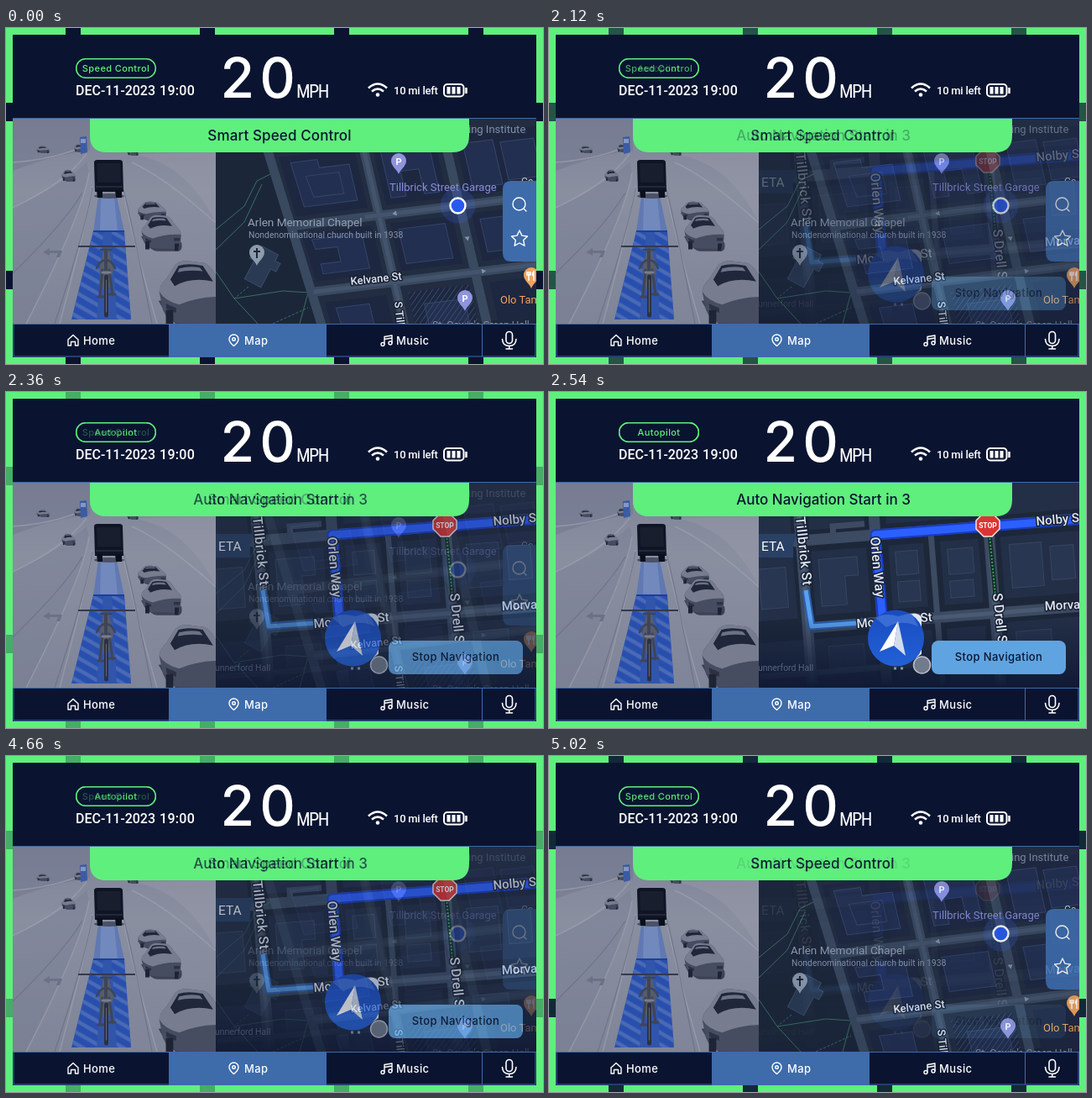
An HTML page for the animation above (5080 ms loop, 640 px wide and 400 px high).

```html
<!DOCTYPE html>
<html lang="en">
<head>
<meta charset="utf-8">
<title>Dashboard</title>
<style>
html, body { margin: 0; width: 100%; height: 100%; overflow: hidden; background: #0a1430; }
svg { display: block; width: 640px; height: 400px; }
text { font-family: Roboto, "Noto Sans", sans-serif; }
.ui { font-family: Inter, "Open Sans", sans-serif; font-weight: 500; }
.mid { text-anchor: middle; }
.banner { font-size: 17px; fill: #0a1430; }
.chip { font-size: 11px; fill: #5fef7d; letter-spacing: .4px; }
.nav { font-size: 13px; fill: #fff; letter-spacing: .4px; }
.info { font-weight: 500; fill: #fff; }
.unit { font-family: "Roboto Condensed", "Liberation Sans Narrow", Roboto, sans-serif;
  font-size: 22px; font-stretch: extra-condensed; letter-spacing: -1.5px; fill: #fff; }
.street { font-weight: 500; fill: #e2e7ef; stroke: #172136; stroke-width: 3px;
  stroke-linejoin: round; paint-order: stroke; }
.line { fill: none; stroke: #fff; stroke-width: 1.4; stroke-linecap: round; stroke-linejoin: round; }

/* ten even steps in, a hold, nine even steps out */
#guided { animation: blend 5080ms infinite; }
@keyframes blend {
  0% { opacity: 0; animation-timing-function: step-end; }
  39.37% { opacity: 0; animation-timing-function: steps(10, start); }
  51.181% { opacity: 1; animation-timing-function: step-end; }
  89.37% { opacity: 1; animation-timing-function: steps(9, start); }
  100% { opacity: .1; }
}
</style>
</head>
<body>
<svg viewBox="0 0 640 400">
<defs>
  <clipPath id="mapClip"><path d="M250 108H632V352H250z"/></clipPath>
  <clipPath id="roadClip"><path d="M8 108H250V352H8z"/></clipPath>
  <clipPath id="laneClip"><path d="M104 242H141L149 347H78z"/></clipPath>
  <linearGradient id="ground" x2="0" y2="1">
    <stop offset="0" stop-color="#7d8396"/><stop offset=".35" stop-color="#8a8fa0"/>
    <stop offset="1" stop-color="#7f8598"/>
  </linearGradient>
  <linearGradient id="dusk" x2="0" y2="1">
    <stop offset="0" stop-color="#101a34" stop-opacity="0"/>
    <stop offset="1" stop-color="#101a34"/>
  </linearGradient>
  <linearGradient id="puck" x2="0" y2="1">
    <stop offset="0" stop-color="#1a4bc0"/><stop offset="1" stop-color="#2260d6"/>
  </linearGradient>
  <pattern id="hatch" width="5" height="5" patternUnits="userSpaceOnUse" patternTransform="rotate(45)">
    <path d="M0 0V5" stroke="#3a4c69" stroke-width="1.6"/>
  </pattern>
  <pattern id="stripes" width="12" height="12" patternUnits="userSpaceOnUse" patternTransform="rotate(30)">
    <path d="M0 3H12" stroke="#4a6ab5" stroke-width="4.5"/>
  </pattern>
  <symbol id="car" viewBox="0 0 100 80" preserveAspectRatio="none">
    <path d="M2 48Q20 76 40 78H92Q102 74 98 60L60 44z" fill="#3c4255"/>
    <path d="M3 38Q4 30 12 25L24 10Q30 4 44 5L64 7Q72 9 79 20L92 33Q98 38 97 50L95 66Q92 73 84 73L28 72Q14 70 8 58z" fill="#474d60"/>
    <path d="M3 38Q4 30 12 25L24 10Q30 4 44 5L64 7Q72 9 79 20L92 33Q96 38 97 44Q60 42 30 52Q10 48 3 38z" fill="#777d8f"/>
    <path d="M18 25L29 10Q42 7 62 10L76 27Q46 22 24 32z" fill="#20273a"/>
    <path d="M30 13Q44 10 58 12L62 16Q44 14 28 17z" fill="#6c7285"/>
    <path d="M12 51L26 56V61L13 57zM80 51H95L94 57H80z" fill="#2c3245"/>
    <path d="M12 58H22V74H12zM82 62H93L90 77H82z" fill="#1e2434"/>
  </symbol>
  <symbol id="pin" viewBox="-10 -11 20 27" overflow="visible">
    <path d="M0 15C-2 9-9 6-9-1A9 9 0 1 1 9-1C9 6 2 9 0 15z"/>
  </symbol>
</defs>

<rect width="640" height="400" fill="#5fef7d"/>
<rect x="8" y="8" width="624" height="384" fill="#0a1430"/>
<!-- gaps in the frame: every 160 across, every 200 down -->
<g fill="none" stroke="#0a1430" stroke-width="8">
  <path d="M71 4H640M71 396H640" stroke-dasharray="18 142"/>
  <path d="M4 89V400M636 89V400" stroke-dasharray="22 178"/>
</g>

<!-- header -->
<text class="info" x="83" y="80" font-size="16">DEC-11-2023</text>
<text class="info" x="183" y="80" font-size="16" letter-spacing=".3">19:00</text>
<text class="ui" x="255.500" y="83" font-size="66" letter-spacing="6" fill="#fff">20</text>
<text class="unit" x="346" y="83">MPH</text>
<g fill="none" stroke="#fff" stroke-width="2.6">
  <path d="M432 71.500Q443 61.500 454 71.500M436 75.500Q443 69.500 450 75.500"/>
  <circle cx="443" cy="79.500" r="2.300" fill="#fff" stroke="none"/>
  <rect x="522" y="67" width="23.500" height="14.500" rx="4" stroke-width="2"/>
  <path d="M548.500 71V78" stroke-width="2.500"/>
  <path d="M527.500 70V78.500M533.500 70V78.500M539.500 70V78.500" stroke-width="4"/>
</g>
<text class="info" x="462" y="79" font-size="13" letter-spacing="-.25">10 mi left</text>

<!-- road view -->
<g clip-path="url(#roadClip)">
  <path d="M8 108H250V352H8z" fill="url(#ground)"/>
  <path d="M8 108H100V146Q60 150 8 170z" fill="#70778d" opacity=".5"/>
  <path d="M8 214Q70 185 96 160L99 172Q88 232 24 352H8z" fill="#747a8f" opacity=".35"/>
  <path d="M150 150Q215 160 250 232V148z" fill="#989cab" opacity=".4"/>
  <g fill="none" stroke="#a0a4b2" stroke-width="1.500" opacity=".6">
    <path d="M99 172Q92 220 24 352M103 188Q98 225 64 352M139 190Q148 240 180 352"/>
    <path d="M96 150Q70 185 8 214M8 160Q60 156 94 140M150 160Q190 178 250 232"/>
  </g>
  <path d="M103 190Q96 236 58 352M140 192Q153 245 174 352M91 196Q70 232 8 292" fill="none" stroke="#696f84" stroke-width="1.200" opacity=".75"/>
  <path d="M44 267L52 262V265H67L64 273H60L62 268H52V271z" fill="#6b7186"/>
  <use href="#car" x="36" y="140" width="16" height="9"/>
  <use href="#car" x="66" y="168" width="17" height="15"/>
  <use href="#car" x="144" y="142" width="14" height="10"/>
  <use href="#car" x="81" y="138" width="12" height="10"/>
  <path d="M88 130L96 129L97 148L89 150z" fill="#3c5ba3"/><path d="M89 132H95V137H89z" fill="#8397c0"/>
  <path d="M110 201H132L141 242H104z" fill="#6079b2"/>
  <path d="M113 201H129L133 242H112z" fill="#7189bd"/>
  <g clip-path="url(#laneClip)">
    <path d="M70 242H155V348H70z" fill="#294fae"/>
    <path d="M70 242H155V348H70z" fill="url(#stripes)"/>
    <path d="M116 242H126L132 348H108z" fill="#3155ab"/>
  </g>
  <path d="M104 242H141" stroke="#1b3f9c" stroke-width="2"/>
  <ellipse cx="123" cy="200" rx="18" ry="3" fill="#4b5166"/>
  <path d="M105 160Q105 157 109 157H135Q139 157 139 160L140 195H106z" fill="#0f1524"/>
  <path d="M108 161H136L137 184H109z" fill="#181e2e"/>
  <path d="M107 189H139" stroke="#222939" stroke-width="2"/>
  <path d="M108 193H115V202H109zM130 193H138V202H131z" fill="#0a0f1c"/>
  <use href="#car" x="156" y="205" width="36" height="25"/>
  <use href="#car" x="160" y="220" width="50" height="47"/>
  <use href="#car" x="180" y="272" width="88" height="88"/>
  <path d="M86 260H154" stroke="#323950" stroke-width="1.800"/>
  <path d="M117 262H122L128 288L122 312H116L111 288z" fill="#565c6c"/>
  <g fill="none" stroke="#3f4557" stroke-linecap="round">
    <path d="M119 264V290" stroke-width="4"/>
    <path d="M108 286Q111 277 119 276Q127 277 130 286M113 264H126" stroke-width="2.500"/>
    <path d="M115 288L112 318M123 288L127 318M110 320H116M123 317H130" stroke-width="3"/>
    <path d="M119.500 296V342" stroke="#2b3142" stroke-width="5"/>
    <path d="M119.500 300V338" stroke="#5c6273" stroke-width="1.200"/>
    <path d="M115 291H124" stroke="#777d8e" stroke-width="3"/>
  </g>
</g>

<!-- area map -->
<g clip-path="url(#mapClip)">
  <path d="M250 108H632V352H250z" fill="#1c2639"/>
  <g fill="none" stroke="#38705f" stroke-width="1">
    <path d="M250 240L284 212L299 182L315 174M250 264L284 231L305 186M250 290L272 322L300 352M272 322L330 313L360 315L350 352"/>
    <path d="M318 352L360 333M289 308L272 322" stroke-dasharray="3 2"/>
  </g>
  <g transform="rotate(28 303 287)" fill="#2a3a53" stroke="#3b4e6a">
    <path d="M292 262H314V270H321V281H314V306H292V281H286V270H292z"/>
  </g>
  <g transform="translate(442 305) rotate(-7) skewX(6)">
    <path d="M-93-220L-74 60H240V-220z" fill="#222d41"/>
    <path d="M-80-164H10V-92H-76zM32-164H106V-92H32zM130-164H240V-92H130z
      M-74-70H10V-12H-70zM32-70H106V-12H32zM130-70H240V-12H130zM-66 14H8V80H-62zM34 14H108V80H34zM132 14H240V80H132z" fill="#1d2740"/>
    <g fill="#232f50" stroke="#34446a">
      <path d="M-68-156H-36V-146H0V-102H-64zM-54-138H-14V-112H-50z"/>
      <path d="M40-156H98V-100H80V-130H58V-100H40zM138-154H174V-100H138zM182-150H222V-104H182z"/>
      <path d="M-64-62H-4V-20H-60V-32H-36V-50H-62zM40-62H96V-20H40zM138-62H194V-22H138zM200-58H222V-22H200z"/>
      <path d="M-54 22H-14V74H-50zM50 30H98V60H50z"/>
    </g>
    <path d="M34 14H108V80H34z" fill="url(#hatch)"/>
    <g fill="none" stroke="#39495f" stroke-width="11">
      <path d="M-95-220L-74 60M21-200V80M118-200V80M-86-81H230M-76 0H230"/>
    </g>
    <path d="M4-81H230M-76 0H230M21-200V80" fill="none" stroke="#44546c" stroke-width="5"/>
    <path d="M126-3L131 0L126 3zM115-43L118-38L121-43zM42-84L37-81L42-78z" fill="#8492a8"/>
  </g>
  <text x="551" y="125" font-size="13" fill="#8290a8">ing Institute</text>
  <text x="457" y="194" font-size="13" fill="#8a8ed8">Tillbrick Street Garage</text>
  <text x="288" y="236" font-size="13.500" fill="#94a1b7">Arlen Memorial Chapel</text>
  <text x="289" y="250" font-size="10.400" fill="#8996ac">Nondenominational church built in 1938</text>
  <text x="614" y="187" font-size="12" fill="#c5ccd8">Co</text>
  <text x="508" y="358" font-size="12" fill="#8290a8">St. Oswin's Green Hall</text>
  <text class="street" font-size="13" transform="translate(411 306) rotate(-6)">Kelvane St</text>
  <text class="street" font-size="13" transform="translate(463 326) rotate(84)">S Tillbrick St</text>
  <text x="589" y="328" font-size="13" fill="#f0a35e">Olo Tamba</text>
  <g fill="#8f94db">
    <use href="#pin" x="458" y="148" width="20" height="27"/>
    <use href="#pin" x="537" y="311" width="20" height="27"/>
  </g>
  <g class="mid" font-size="11" font-weight="700" fill="#fff">
    <text x="468" y="163">P</text><text x="547" y="326">P</text>
  </g>
  <use href="#pin" x="289" y="257" width="20" height="27" fill="#8d9bae"/>
  <path d="M299 262V274M295 266H303" stroke="#1c2639" stroke-width="2"/>
  <use href="#pin" x="616" y="284" width="20" height="27" fill="#f0a35e"/>
  <path d="M623 290V301M621 290V294H625V290M629 301V290Q626 293 629 296" fill="none" stroke="#fff" stroke-width="1.500"/>
  <circle cx="538.500" cy="211.500" r="21" fill="#3f6cff" opacity=".18"/>
  <circle cx="538.500" cy="211.500" r="9" fill="#285af0" stroke="#fff" stroke-width="2.400"/>
  <path d="M632 182H602Q592 182 592 192V268Q592 278 602 278H632z" fill="#3e6baa"/>
  <g class="line">
    <circle cx="611.500" cy="209.500" r="7.500"/><path d="M617 215L620 218"/>
    <path d="M612 241L614.900 247.100L621.500 248L616.700 252.600L617.900 259.200L612 256L606.100 259.200L607.300 252.600L602.500 248L609.100 247.100z"/>
  </g>
</g>
<path d="M8 107.500H632" stroke="#3e6baa"/>
<rect id="pill" x="83.750" y="36.750" width="94.500" height="22.500" rx="11" fill="#0a1430" stroke="#5fef7d" stroke-width="1.500"/>
<text class="ui chip mid" x="131" y="52">Speed Control</text>
<path id="tab" d="M100 108H552V128Q552 148 532 148H120Q100 148 100 128z" fill="#5fef7d"/>
<text class="ui banner mid" x="326" y="134" letter-spacing=".12">Smart Speed Control</text>

<!-- guided state -->
<g id="guided">
  <path d="M4 4H636V396H4z" fill="none" stroke="#5fef7d" stroke-width="8"/>
  <g clip-path="url(#mapClip)">
    <path d="M250 108H632V352H250z" fill="#1d273a"/>
    <g transform="translate(389 170) rotate(-4.500)">
      <path d="M-150-60H-100V92H-150zM-78-60H-12V-12H-78zM-78 14H-12V90H-78zM14-60H124V-12H14zM14 14H56V90H14zM76 14H122V90H76z
        M148-60H260V-12H148zM148 14H260V88H148zM-150 118H-10V200H-150zM14 118H58V200H14zM76 118H122V200H76zM148 116H260V200H148z" fill="#232f47"/>
      <g fill="#283651" stroke="#36465f">
        <path d="M-70 24H-24V46H-40V80H-70zM22 22H48V50H22zM84 24H114V54H84zM158 24H196V76H158zM206 30H234V70H206z"/>
        <path d="M22 58H48V82H22zM84 62H112V82H84zM-66 128H-24V160H-66zM158 128H200V160H158zM-142 30H-110V78H-142z"/>
      </g>
      <g fill="none" stroke="#3c4b62" stroke-width="13">
        <path d="M-89-70V200M0-70V200M135-70V200M-150 0H260M-89 104H260"/>
        <path d="M66-4V200M-150 158H66M-50 0V-14H-12" stroke-width="7"/>
      </g>
      <path d="M-89-70V200M-89 104H260M135 0V200" fill="none" stroke="#4a5a72" stroke-width="5"/>
    </g>
    <path d="M525 170L532 242" stroke="#122b27" stroke-width="5"/>
    <path d="M525 170L532 242" stroke="#3f9e62" stroke-width="2" stroke-dasharray="2 2"/>
    <g fill="none" stroke-linejoin="round">
      <path d="M306 236L313 279L384 274" stroke="#2a5fae" stroke-width="9"/>
      <path d="M306 236L313 279L384 274" stroke="#5aa0f0" stroke-width="5"/>
      <path d="M640 151L389 170L398 276" stroke="#173cc0" stroke-width="13"/>
      <path d="M640 151L389 170L398 276" stroke="#2b5fff" stroke-width="9"/>
    </g>
    <path d="M250 268H632V352H250z" fill="url(#dusk)"/>
    <text x="242" y="332" font-size="10.500" fill="#56647e">Dunnerford Hall</text>
    <path d="M250 169H285L297 168L291 181V197H250z" fill="#2a4166"/>
    <text x="253" y="189" font-size="15.500" fill="#fff">ETA</text>
    <g class="street" font-size="16">
      <text transform="translate(294 149) rotate(84)" letter-spacing=".5">Tillbrick St</text>
      <text transform="translate(383 173) rotate(85)">Orlen Way</text>
      <text transform="translate(529 240) rotate(84)">S Drell St</text>
      <text transform="translate(581 159) rotate(-5)" font-size="15">Nolby St</text>
      <text transform="translate(591 260) rotate(-3)" font-size="15">Morvane St</text>
      <text transform="translate(367 281) rotate(-5)" font-size="15">Mo</text>
      <text transform="translate(443 274) rotate(-5)" font-size="15">St</text>
    </g>
    <path d="M518 144H528L537 153V163L528 172H518L509 163V153z" fill="#dc3434" stroke="#f2e4e6" stroke-width="1.500"/>
    <text class="mid" x="523" y="161.500" font-size="8.500" font-weight="700" fill="#fff">STOP</text>
    <path d="M430 264Q440 262 444 268V312L432 320z" fill="#dfe7f4"/>
    <circle cx="413.500" cy="293" r="33.500" fill="url(#puck)"/>
    <path d="M389 269Q400 262 416 267L432 263L440 279Q420 270 402 280z" fill="#4f80df" opacity=".6"/>
    <path d="M416 273L394 309L411 302z" fill="#fff"/><path d="M416 273L425 314L411 302z" fill="#d3dcec"/>
    <path d="M411 329H414M419 329H422" stroke="#8c97aa" stroke-width="3"/>
    <circle cx="444.500" cy="325" r="10" fill="#717b8c" stroke="#b9c0cb" stroke-width="1.500"/>
    <rect x="456" y="296" width="160" height="40" rx="8" fill="#5fa4e0"/>
    <text class="ui mid" x="536" y="320" font-size="13" letter-spacing=".4" fill="#0a1430">Stop Navigation</text>
  </g>
  <path d="M8 107.500H632" stroke="#3e6baa"/>
  <use href="#pill"/>
  <text class="ui chip mid" x="131" y="52">Autopilot</text>
  <use href="#tab"/>
  <text class="ui banner mid" x="327" y="134">Auto Navigation Start in 3</text>
</g>

<!-- navigation bar -->
<path d="M8 352H632V392H8z" fill="#0a1430"/>
<path d="M8 352.500H632M9 352V391H631V352M567.500 352V391" fill="none" stroke="#3e6baa"/>
<path d="M194 352H382V392H194z" fill="#3e6baa"/>
<text class="ui nav" x="92" y="376.500">Home</text>
<text class="ui nav" x="284" y="376.500">Map</text>
<text class="ui nav" x="465" y="376.500">Music</text>
<g class="line">
  <path d="M74 371L80 365.500L86 371V378H82.500V373.500H77.500V378H74z"/>
  <path d="M271.500 378.500Q266 374 266 370.500A5.500 5.500 0 0 1 277 370.500Q277 374 271.500 378.500z"/>
  <circle cx="271.500" cy="370.500" r="1.800"/>
  <path d="M451 376V367.500L460 366V374.500M451 370.500L460 369"/>
  <circle cx="449" cy="376.500" r="2"/><circle cx="458" cy="375" r="2"/>
  <rect x="596" y="361.500" width="7.500" height="14" rx="3.750" stroke-width="1.600"/>
  <path d="M591.500 370.500Q592 378.500 599.750 378.500Q607.500 378.500 608 370.500M599.750 378.500V382M596 382H603.500" stroke-width="1.600"/>
</g>
</svg>
</body>
</html>
```
